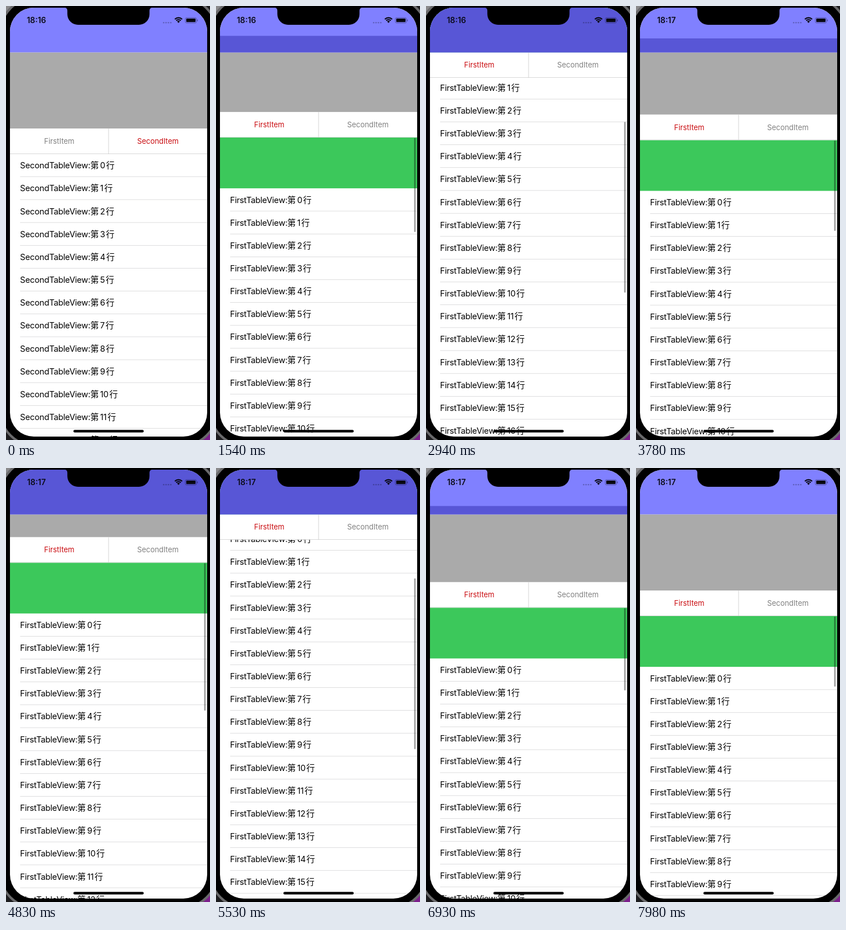
Write an HTML page with a canvas that moves like this. It is 360x762 px and loops after 8000 ms.

```html
<!DOCTYPE html>
<html lang="en">
<head>
<meta charset="utf-8">
<title>Nested table scrolling</title>
<style>
  html, body { margin: 0; width: 100%; height: 100%; overflow: hidden; background: #000; }
  canvas { display: block; width: 360px; height: 762px; }
</style>
</head>
<body>
<canvas id="stage"></canvas>
<script>
const canvas = document.getElementById('stage');
const ratio = window.devicePixelRatio || 1;
canvas.width = 360 * ratio;
canvas.height = 762 * ratio;
const ctx = canvas.getContext('2d');

const LOOP = 8000, STEP = 70;
const SCALE = 348 / 390;            // screen points to pixels
const W = 390, H = 844, NAV = 88, HEADER = 150, TABS = 50, GREEN = 100, ROW = 45, ROWS = 30;
const LATIN = 'Inter, Roboto, sans-serif';
const HAN = '"Noto Sans CJK SC", "Noto Sans CJK", "Noto Sans CJK JP", sans-serif';

// [time in ms, vertical scroll in points]
const scrollKeys = [
  [1470, 0], [1540, 32.5], [1750, 140], [2030, 265], [2380, 350], [2590, 360],
  [2940, 298], [3220, 190], [3500, 95], [3780, 27.5], [4060, 6], [4340, 12],
  [4620, 52], [4830, 105], [5110, 215], [5390, 275], [5600, 265], [5880, 200],
  [6230, 103], [6510, 50], [6860, 20], [7350, 4], [7770, 0]
];

function slope(i) {
  const a = scrollKeys[Math.max(i - 1, 0)];
  const b = scrollKeys[Math.min(i + 1, scrollKeys.length - 1)];
  return (b[1] - a[1]) / (b[0] - a[0]);
}

// Smooth curve through the scroll keys
function scrollAt(t) {
  const last = scrollKeys.length - 1;
  if (t <= scrollKeys[0][0] || t >= scrollKeys[last][0]) return 0;
  let i = 0;
  while (scrollKeys[i + 1][0] <= t) i++;
  const [t0, y0] = scrollKeys[i], [t1, y1] = scrollKeys[i + 1];
  const d = t1 - t0, u = (t - t0) / d, v = 1 - u;
  const y = y0 * (1 + 2 * u) * v * v + y1 * u * u * (3 - 2 * u)
          + d * u * v * (slope(i) * v - slope(i + 1) * u);
  return Math.max(0, y);
}

function pageAt(t) {
  const u = Math.min(1, Math.max(0, (t - 350) / 630));
  return u < 0.5 ? 2 * u * u : 1 - 2 * (1 - u) * (1 - u);
}

function rect(x, y, w, h, color) {
  ctx.fillStyle = color;
  ctx.fillRect(x, y, w, h);
}

function pill(x, y, w, h, r, color) {
  ctx.fillStyle = color;
  ctx.beginPath();
  ctx.roundRect(x, y, w, h, r);
  ctx.fill();
}

function text(str, x, y, font, color, align = 'left', spacing = 0) {
  ctx.font = font;
  ctx.fillStyle = color;
  ctx.textAlign = align;
  ctx.letterSpacing = spacing + 'px';
  ctx.fillText(str, x, y);
  return ctx.measureText(str).width;
}

function drawRow(label, hanX, index, y) {
  const base = y + 28.5, latin = '16.4px ' + LATIN, han = '16.6px ' + HAN;
  text(label, 20, base, latin, '#000', 'left', -0.25);
  text('第', hanX, base, han, '#000');
  const x = hanX + 19.3;
  const w = text(String(index), x, base, latin, '#000', 'left', -0.2);
  text('行', x + w + 1.7, base, han, '#000');
  rect(20, y + ROW - 0.6, W - 20, 0.7, '#c9c9cb');
}

function drawTable(label, hanX, x, top) {
  ctx.save();
  ctx.translate(x, 0);
  rect(0, 0, W, H, '#fff');
  for (let i = 0; i < ROWS; i++) {
    const y = top + i * ROW;
    if (y > -ROW && y < H) drawRow(label, hanX, i, y);
  }
  ctx.restore();
}

function drawTabs(y, first) {
  const font = '14.5px ' + LATIN, on = '#c90c10', off = '#808080';
  rect(0, y, W, TABS, '#fff');
  rect(194.5, y, 1, TABS, '#cfcfcf');
  rect(0, y + TABS - 0.8, W, 0.8, '#c8c8c8');
  text('FirstItem', 97.5, y + 30, font, first ? on : off, 'center');
  text('SecondItem', 292.5, y + 30, font, first ? off : on, 'center');
}

function drawStatus(t) {
  text(t < 3360 ? '18:16' : '18:17', 52.3, 30.2, '600 15.5px ' + LATIN, '#0b0b18', 'center');
  for (let i = 0; i < 4; i++) pill(302.5 + i * 4.7, 28, 3, 3, 1.5, 'rgba(0,0,0,.25)');

  const cx = 333.3, cy = 30;
  const from = -Math.PI * 0.75, to = -Math.PI * 0.25;
  ctx.strokeStyle = '#08080f';
  ctx.lineWidth = 2.4;
  for (const r of [6.4, 10.2]) {
    ctx.beginPath();
    ctx.arc(cx, cy, r, from, to);
    ctx.stroke();
  }
  ctx.fillStyle = '#08080f';
  ctx.beginPath();
  ctx.moveTo(cx, cy);
  ctx.arc(cx, cy, 3.8, from, to);
  ctx.fill();

  ctx.strokeStyle = 'rgba(0,0,0,.38)';
  ctx.lineWidth = 1;
  ctx.beginPath();
  ctx.roundRect(346.8, 19.7, 22, 10.6, 2.8);
  ctx.stroke();
  pill(348.6, 21.5, 18.4, 7, 1.4, '#08080f');
  pill(370, 23, 1.4, 4, 0.7, 'rgba(0,0,0,.4)');
}

function drawNotch() {
  const l = 113.5, r = 276, b = 33.7, c = 21, f = 6;
  ctx.fillStyle = '#000';
  ctx.beginPath();
  ctx.moveTo(l - f, -1);
  ctx.lineTo(l - f, 0);
  ctx.quadraticCurveTo(l, 0, l, f);
  ctx.arcTo(l, b, l + c, b, c);
  ctx.arcTo(r, b, r, b - c, c);
  ctx.lineTo(r, f);
  ctx.quadraticCurveTo(r, 0, r + f, 0);
  ctx.lineTo(r + f, -1);
  ctx.fill();
}

function drawBody() {
  rect(0, 0, 360, 762, '#1c1c1e');
  rect(0, 0, 30, 30, '#8a8a8c');
  rect(330, 732, 30, 30, '#7d1f8c');
  ctx.beginPath();
  ctx.roundRect(-9, -13, 380, 784, 58);
  ctx.fillStyle = '#000';
  ctx.fill();
  ctx.strokeStyle = '#6a6a6c';
  ctx.lineWidth = 4;
  ctx.stroke();
}

function draw(t) {
  const s = scrollAt(t), page = pageAt(t);
  const tabY = NAV + Math.max(0, HEADER - s);
  const listY = tabY + TABS;
  const contentY = NAV + HEADER + TABS - s;

  ctx.setTransform(ratio, 0, 0, ratio, 0, 0);
  drawBody();
  ctx.save();
  ctx.translate(7, 2.9);
  ctx.scale(SCALE, SCALE);
  ctx.beginPath();
  ctx.roundRect(0, 0, W, H, 47);
  ctx.clip();

  if (page < 1) drawTable('SecondTableView:', 159, W * page, contentY);
  if (page > 0) {
    const x = W * (page - 1);
    drawTable('FirstTableView:', 133.3, x, contentY + GREEN);
    rect(x, contentY, W, GREEN, '#3cc85b');
  }
  if (t >= 1540) {
    const top = Math.max(listY + 1, 91 + s * 0.449);
    const bottom = 427 + s * 0.449;
    pill(384, top, 3, bottom - top, 1.5, 'rgba(0,0,0,.38)');
  }

  rect(0, NAV, W, tabY - NAV, '#aaa');
  drawTabs(tabY, page >= 0.5);
  const dark = Math.min(s, NAV);
  rect(0, 0, W, NAV, '#8080ff');
  rect(0, NAV - dark, W, dark, '#5856d6');
  drawStatus(t);
  drawNotch();
  pill(125.5, 830.8, 139, 5, 2.5, '#000');
  ctx.restore();
}

const start = performance.now();
function tick() {
  const t = (performance.now() - start) % LOOP;
  draw(Math.floor(t / STEP) * STEP);
  requestAnimationFrame(tick);
}
tick();
</script>
</body>
</html>
```
